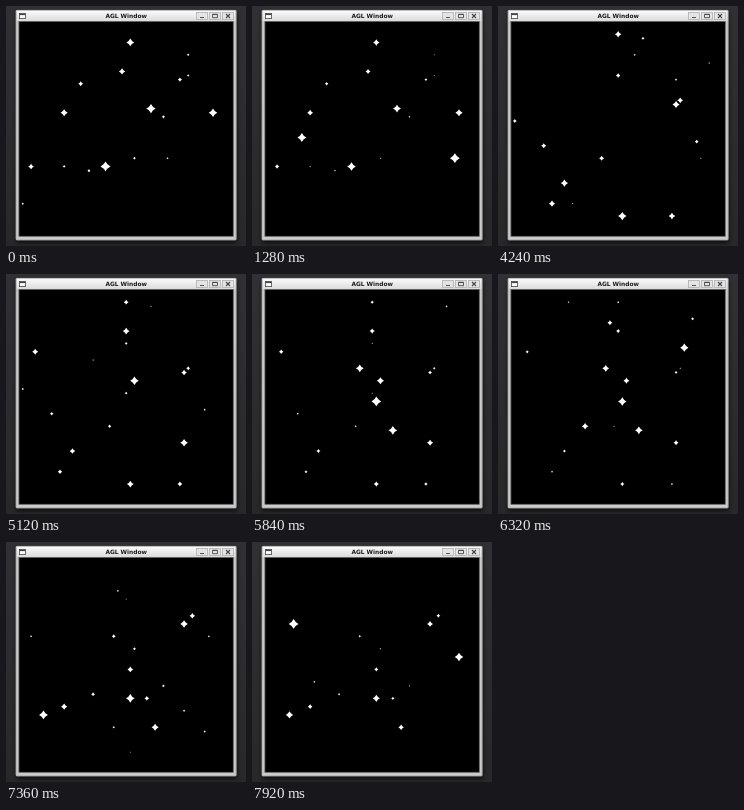
Recreate the animation shown at these times as an HTML page. Size 240x240 px, loop 8000 ms.

```html
<!DOCTYPE html>
<html lang="en">
<head>
<meta charset="utf-8">
<title>Twinkling stars</title>
<style>
  html, body { margin: 0; width: 100%; height: 100%; overflow: hidden; background: #2b2b2f; }
  svg { display: block; width: 100vw; height: 100vh; }
  text { font: bold 5.9px "DejaVu Sans", sans-serif; text-anchor: middle; }
</style>
</head>
<body>
<svg viewBox="0 0 240 240">
  <defs>
    <linearGradient id="desk" x2="0" y2="1">
      <stop stop-color="#313135"/><stop offset="1" stop-color="#28282b"/>
    </linearGradient>
    <linearGradient id="bar" x2="0" y2="1">
      <stop stop-color="#fafafa"/><stop offset="1" stop-color="#dcdcdc"/>
    </linearGradient>
    <filter id="blur" x="-10%" y="-10%" width="120%" height="120%"><feGaussianBlur stdDeviation="2.2"/></filter>
    <rect id="button" x=".5" y=".5" width="11" height="7" fill="#e4e4e4" stroke="#b0b0b0" stroke-width=".8"/>
  </defs>
  <rect width="240" height="240" fill="url(#desk)"/>
  <rect x="10" y="6" width="221" height="231" fill="#000" opacity=".65" filter="url(#blur)"/>
  <rect x="9.8" y="4" width="220.6" height="230.2" rx="1" fill="#cbcbcb"/>
  <rect x="10.1" y="4.3" width="220" height="229.6" rx="1" fill="none" stroke="#999" stroke-width=".6"/>
  <rect x="10.8" y="4.8" width="218.6" height="10.2" fill="url(#bar)"/>
  <rect x="12.9" y="15.4" width="214.4" height="214.9" stroke="#666" stroke-width=".8"/>
  <g fill="#fff" stroke="#444" stroke-width=".8">
    <rect x="13.4" y="7.4" width="6" height="5.2"/>
    <path d="M13.4 8.4h6" stroke-width="1.4"/>
  </g>
  <text x="120.2" y="12.2" fill="#1c1c1c">AGL Window</text>
  <use href="#button" x="190" y="6"/>
  <use href="#button" x="203" y="6"/>
  <use href="#button" x="216" y="6"/>
  <g fill="none" stroke="#444" stroke-width=".9">
    <path d="M194 11.5h4"/>
    <path d="M206.5 8.5h5v3.2h-5zM206.5 8.3h5"/>
    <path d="M220 8l4 4m0-4l-4 4" stroke-width="1.1"/>
  </g>
  <g id="sky" fill="#fff"></g>
</svg>
<script>
const LOOP = 8000, STEP = 80, STEADY = 5600, CELL = 4.135, CELLS = 50;
const sky = document.getElementById('sky');
const all = [];

// The picture updates rarely at first, then at every step.
const updates = [0, 240, 480, 2480, 2720, 4240, 4400, 5040, 5120, 5440];
const shownTime = t => t >= STEADY
  ? Math.floor(t / STEP) * STEP
  : updates.findLast(start => start <= t);

// Pixels every star has lost by time t; the pace drifts a little.
const shrinkage = t => 0.0023 * t + 0.7 * Math.sin(2 * Math.PI * t / LOOP);

function addStar(col, row, born, full) {
  const node = document.createElementNS('http://www.w3.org/2000/svg', 'path');
  node.setAttribute('d', 'M0-1Q.32-.32 1 0Q.32.32 0 1Q-.32.32-1 0Q-.32-.32 0-1Z');
  sky.append(node);
  all.push({ node, x: 16.8 + col * CELL, y: 19.9 + row * CELL, born, full });
}

// Grid cells listed from brightest to dimmest; sizes are spaced evenly at time `seen`
// and births evenly from `first` to `seen`, the brightest last.
function burst(first, seen, brightest, dimmest, ...cells) {
  cells.forEach(([col, row], i) => {
    const rank = i / Math.max(1, cells.length - 1);
    const size = brightest + (dimmest - brightest) * rank;
    addStar(col, row, seen + (first - seen) * rank, size + shrinkage(seen));
  });
}

function seededRandom(seed) {
  return () => (seed = seed * 16807 % 2147483647) / 2147483647;
}

burst(0, 0, 9.2, 3.4,
  [20, 34], [31, 20], [46, 21], [26, 4], [10, 21], [24, 11], [2, 34], [14, 14], [38, 13]);
burst(240, 240, 9.6, 9, [45, 32], [8, 27]);
burst(2480, 2480, 9.6, 4.2,
  [39, 19], [25, 2], [40, 18], [7, 29], [25, 12], [44, 28], [31, 3], [39, 13], [47, 9]);
burst(2720, 2720, 8.6, 8.6, [38, 46]);
burst(4240, 4240, 7.6, 3.2, [26, 46], [12, 38], [9, 43], [21, 32], [0, 23]);
burst(4400, 5760, 9, 3.8, [26, 26], [30, 33], [22, 18], [27, 21], [39, 36], [25, 9], [3, 14]);
burst(5920, 6720, 9.7, 3.2, [5, 37], [32, 40], [41, 13], [17, 32], [23, 7]);
burst(6880, 7840, 9.2, 4, [6, 15], [46, 23], [26, 33], [39, 15], [10, 35]);

// Faint, short-lived specks: several at the start, the rest over the whole loop.
const random = seededRandom(7);
for (let i = 0; i < 30; i++) {
  const born = i < 8 ? 0 : Math.floor(random() * LOOP / STEP) * STEP;
  const cell = () => Math.floor(random() * CELLS);
  addStar(cell(), Math.floor(2 + cell() * 0.9), born, 1.2 + 1.4 * random() + shrinkage(born));
}

function draw(t) {
  const now = shownTime(t), lost = shrinkage(now);
  for (const { node, x, y, born, full } of all) {
    const size = full - lost;
    const visible = now >= born && size > 0.3;
    node.setAttribute('visibility', visible ? 'visible' : 'hidden');
    if (visible) node.setAttribute('transform', `translate(${x} ${y}) scale(${size / 2 + 0.4})`);
  }
}

const start = performance.now();
function tick() {
  draw((performance.now() - start) % LOOP);
  requestAnimationFrame(tick);
}
tick();
</script>
</body>
</html>
```
